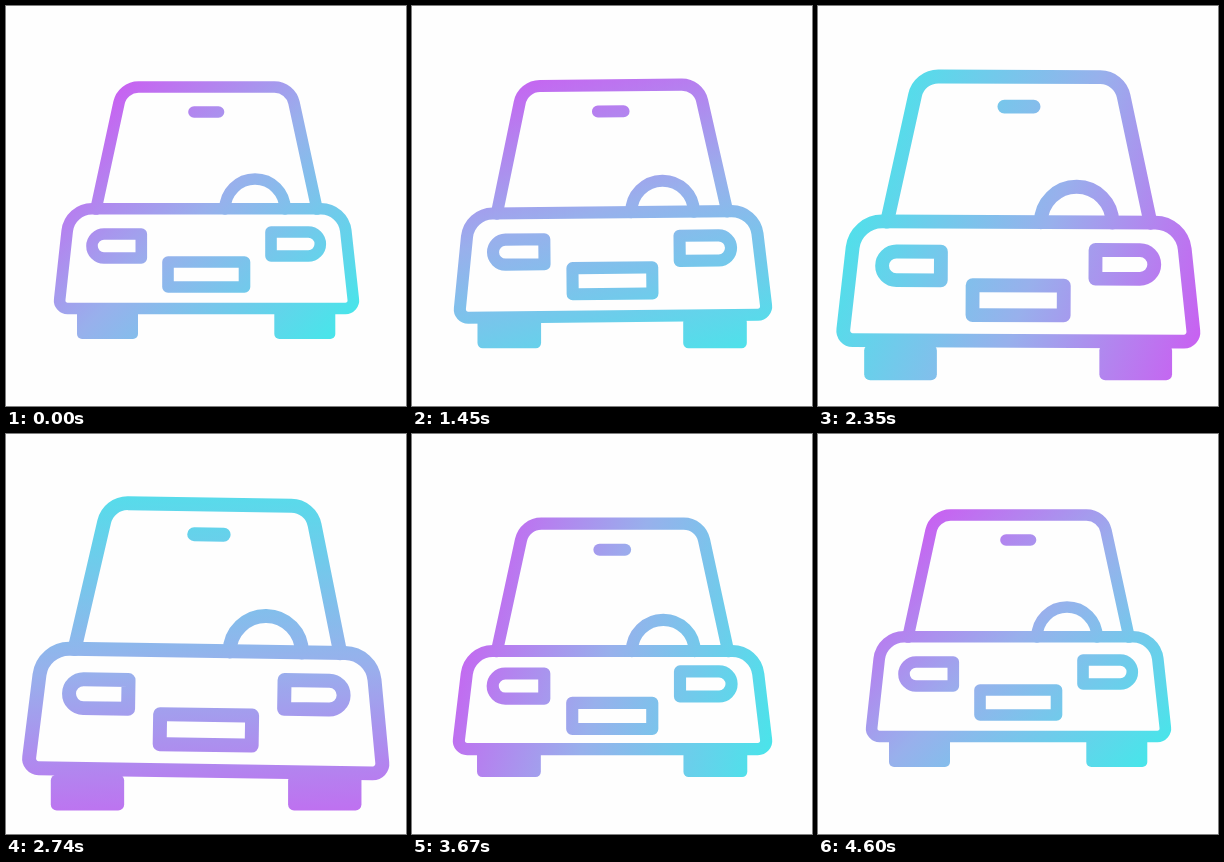
Recreate the animation shown at these times as an HTML page. Size 400 by 400 pixels, loop 4.63 s.

```html
<!DOCTYPE html>
<html lang="en">
<head>
<meta charset="utf-8">
<title>Car</title>
<style>
  html, body { margin: 0; width: 100%; height: 100%; overflow: hidden; background: #fefefe; }
  svg { display: block; width: 100%; height: 100%; }
  .line { fill: none; stroke: #fff; stroke-width: 11.6; stroke-linecap: round; stroke-linejoin: round; }
</style>
</head>
<body>
<svg viewBox="0 0 400 400">
  <defs>
    <linearGradient id="paint" gradientUnits="userSpaceOnUse">
      <stop offset="0" stop-color="#d054f2"/>
      <stop offset=".5" stop-color="#98b0ec"/>
      <stop offset="1" stop-color="#4ae4ea"/>
    </linearGradient>
    <mask id="car" maskUnits="userSpaceOnUse" x="0" y="0" width="400" height="400">
      <g id="wheels" fill="#fff">
        <rect x="71" y="303" width="61" height="30" rx="5"/>
        <rect x="268.300" y="303" width="61" height="30" rx="5"/>
      </g>
      <g id="body" class="line">
        <g id="cabin">
          <path d="M90 203L113 96.800A20 20 0 0 1 132.600 81H268.400A20 20 0 0 1 288 96.800L311 203"/>
          <path d="M188 106H212.500"/>
          <path d="M219 203A30 30 0 0 1 279 203"/>
        </g>
        <path id="hood"/>
        <g id="front">
          <path d="M135.300 228V252H98A12 12 0 0 1 98 228Z"/>
          <path d="M265 226V250H302.300A12 12 0 0 0 302.300 226Z"/>
          <path d="M162 256H238.500V281H162Z"/>
        </g>
      </g>
    </mask>
  </defs>
  <rect width="400" height="400" fill="url(#paint)" mask="url(#car)"/>
</svg>
<script>
const LOOP = 4630, CX = 200.3;
const $ = id => document.getElementById(id);
const [paint, wheels, body, cabin, hood, front] =
  ['paint', 'wheels', 'body', 'cabin', 'hood', 'front'].map($);

// Each track lists [time, value] pairs.
const zoom = [[1000, 0], [1540, .055], [1840, .113], [2080, .154], [2350, .192], [2680, .203],
  [3130, .19], [3400, .125], [3670, .0465], [3950, .006], [4150, 0]];
const tilt = [[1000, 0], [1820, -1], [2250, 0], [2700, .9], [3130, .28], [3350, 0]];
const lift = [[1840, 0], [2350, -2.5], [3130, -2.5], [3500, 0]];
const squash = [[3250, 0], [3660, 10], [4190, -7], [4570, 0]];
const turn = [[1000, 0], [1840, 73], [2350, 153], [3130, 282], [3670, 330], [4300, 360]];
const drift = [[1000, 0], [1840, 15], [2350, 30], [3130, 0]];

// Monotone cubic interpolation, flat at both ends and at extremes.
function at(track, t) {
  const last = track.length - 1;
  if (t <= track[0][0]) return track[0][1];
  if (t >= track[last][0]) return track[last][1];
  const i = track.findIndex(k => k[0] > t) - 1;
  const slope = j => (track[j + 1][1] - track[j][1]) / (track[j + 1][0] - track[j][0]);
  const tangent = j => {
    if (j === 0 || j === last) return 0;
    const a = slope(j - 1), b = slope(j);
    return a * b <= 0 ? 0 : 2 * a * b / (a + b);
  };
  const [t0, v0] = track[i], [t1, v1] = track[i + 1];
  const h = t1 - t0, u = (t - t0) / h, w = 1 - u;
  return v0 * (1 + 2 * u) * w * w + tangent(i) * h * u * w * w
    + v1 * u * u * (3 - 2 * u) - tangent(i + 1) * h * u * u * w;
}

function hoodPath(d) {
  const top = 202.8 + d, bottom = 302.5 + d * .4;
  const upper = top + 22, lower = bottom - 9;
  return `M86 ${top}H315A25 25 0 0 1 339.800 ${upper}L347.300 ${lower}` +
    `A8 8 0 0 1 339.400 ${bottom}H61.600A8 8 0 0 1 53.700 ${lower}L61.200 ${upper}A25 25 0 0 1 86 ${top}Z`;
}

const scaleAt = (s, y) => `translate(${CX} ${y}) scale(${s}) translate(${-CX} ${-y})`;
const set = (el, attrs) => {
  for (const k in attrs) el.setAttribute(k, attrs[k]);
};

function draw(t) {
  const s = 1 + at(zoom, t), d = at(squash, t);
  set(wheels, { transform: scaleAt(s, 118) });
  set(body, { transform: `translate(0 ${at(lift, t)}) ${scaleAt(s, 121)} rotate(${at(tilt, t)} ${CX} 250)` });
  set(cabin, { transform: `translate(0 ${d})` });
  set(front, { transform: `translate(0 ${d * .63})` });
  set(hood, { d: hoodPath(d) });

  const angle = (226 + at(turn, t)) * Math.PI / 180;
  const dx = Math.cos(angle), dy = Math.sin(angle);
  const r = 175 * s, off = at(drift, t), cy = 121 + 83 * s;
  set(paint, {
    x1: CX + dx * (off + r), y1: cy + dy * (off + r),
    x2: CX + dx * (off - r), y2: cy + dy * (off - r)
  });
}

const start = performance.now();
function tick() {
  draw((performance.now() - start) % LOOP);
  requestAnimationFrame(tick);
}
tick();
</script>
</body>
</html>
```
